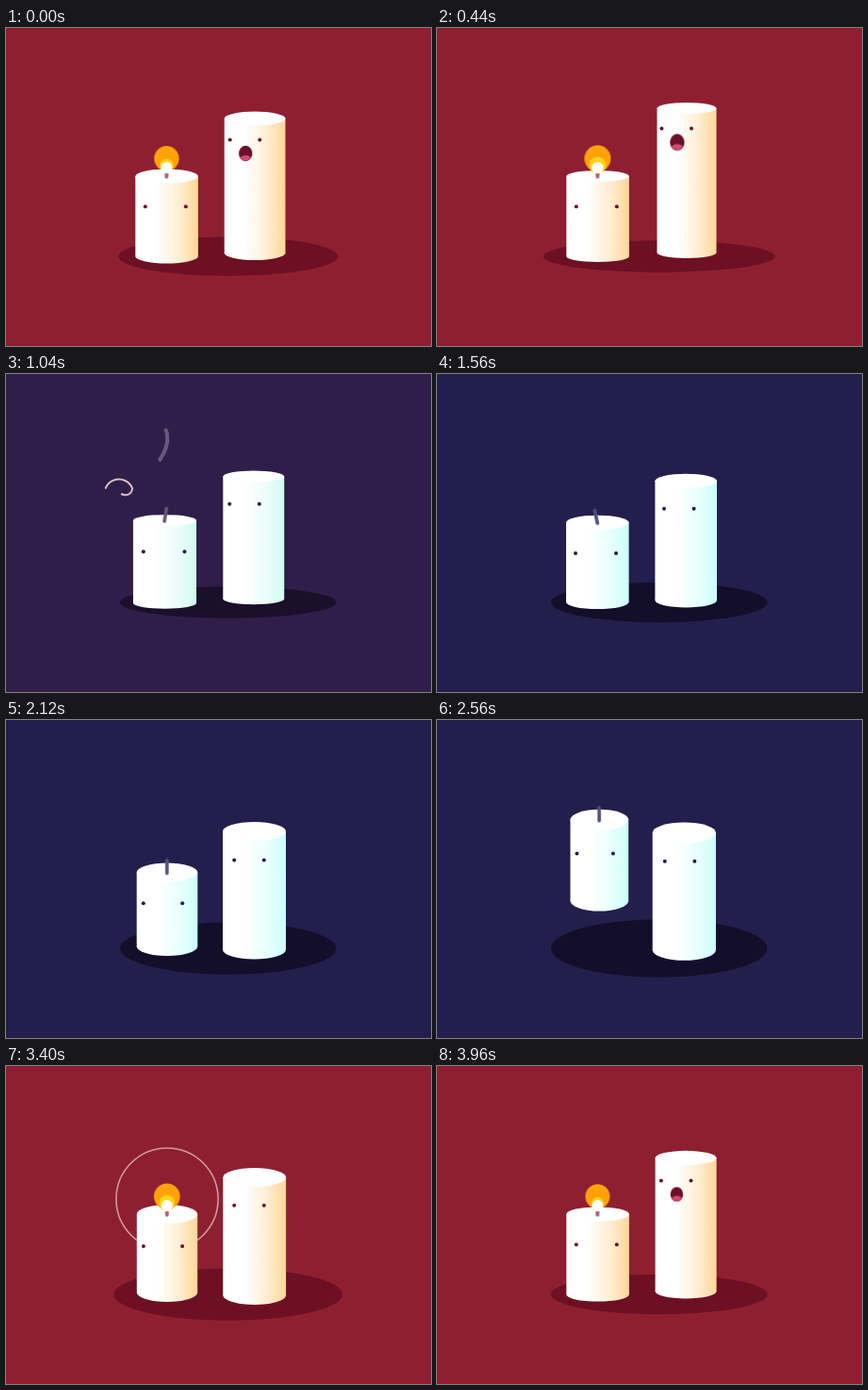
An HTML page without scripts that plays this animation: 451 by 337 pixels, repeating every 4 s.

```html
<!DOCTYPE html>
<html lang="en">
<head>
<meta charset="utf-8">
<title>Two candles</title>
<style>
@property --tilt { syntax: "<length>"; inherits: true; initial-value: 20px; }
@property --flick { syntax: "<number>"; inherits: true; initial-value: 0; }
@property --lit { syntax: "<number>"; inherits: true; initial-value: 1; }
@property --cx { syntax: "<length>"; inherits: true; initial-value: 0px; }
@property --rx { syntax: "<length>"; inherits: true; initial-value: 33px; }
@property --top { syntax: "<length>"; inherits: true; initial-value: 0px; }
@property --bot { syntax: "<length>"; inherits: true; initial-value: 0px; }
@property --ex { syntax: "<length>"; inherits: true; initial-value: 0px; }
@property --ey { syntax: "<length>"; inherits: true; initial-value: 0px; }
@property --gap { syntax: "<length>"; inherits: true; initial-value: 16px; }

html, body { margin: 0; width: 100%; height: 100%; overflow: hidden; background: #8e1f31; }
svg {
  display: block; width: 100vw; height: 100vh;
  --ry: calc(var(--tilt) * .36);
  animation:
    tilt 2s cubic-bezier(.37, 0, .63, 1) -1240ms infinite alternate,
    flick 166.667ms cubic-bezier(.37, 0, .63, 1) -50ms infinite alternate,
    lit 4s linear infinite,
    room 4s linear infinite;
}
svg * { animation: 4s linear infinite; }

@keyframes tilt { from { --tilt: 31px; } to { --tilt: 16px; } }
@keyframes flick { from { --flick: 0; } to { --flick: 1; } }
@keyframes lit { 0%, 15% { --lit: 1; } 18%, 66% { --lit: 0; } 76%, to { --lit: 1; } }
@keyframes room {
  0%, 16.5% { background: #8e1f31; }
  19% { background: #741c33; }
  27%, 66% { background: #241e4c; }
  70% { background: #721c33; }
  75%, to { background: #8e1f31; }
}

/* Floor and light */
.floor {
  cx: 235.7px; cy: 242px;
  rx: calc(114.8px + 8.3px * var(--flick) * var(--lit)); ry: var(--tilt);
  animation-name: floor;
}
@keyframes floor {
  0%, 16.5% { fill: #6e1023; }
  19% { fill: #540f2d; }
  27%, 66% { fill: #130f2b; }
  70% { fill: #5c0e24; }
  75%, to { fill: #6e1023; }
}
.ring { fill: none; stroke: #f3cccf; stroke-width: 1.6; animation-name: ring; }
@keyframes ring {
  0%, 74% { r: 12px; opacity: 0; }
  75% { r: 14px; opacity: .9; animation-timing-function: cubic-bezier(.3, .5, .7, 1); }
  85% { r: 54px; opacity: .7; }
  90%, to { r: 68px; opacity: 0; }
}

/* Candle parts */
.side { fill: url(#wax); }
rect.side {
  x: calc(var(--cx) - var(--rx)); y: var(--top);
  width: calc(var(--rx) * 2); height: calc(var(--bot) - var(--top));
}
ellipse.side, .lid { cx: var(--cx); cy: var(--bot); rx: var(--rx); ry: var(--ry); }
.lid { cy: var(--top); fill: #fff; }
.eye { r: 2px; cy: var(--ey); cx: calc(var(--ex) - var(--gap)); animation-name: ink; }
.eye + .eye { cx: calc(var(--ex) + var(--gap)); }
@keyframes ink {
  0%, 17% { fill: #6b1029; }
  27%, 66% { fill: #231c4b; }
  70% { fill: #351c48; }
  76%, to { fill: #6b1029; }
}
.mid { animation-name: mid; }
.edge { animation-name: edge; }
@keyframes mid {
  0%, 19% { stop-color: #fff0d8; }
  27%, 66% { stop-color: #ecffff; }
  70% { stop-color: #e9f7f4; }
  75%, to { stop-color: #fff0d8; }
}
@keyframes edge {
  0%, 16% { stop-color: #ffd698; }
  19% { stop-color: #ffdea3; }
  27%, 66% { stop-color: #cbfffb; }
  70% { stop-color: #c8e8e1; }
  75%, to { stop-color: #ffd698; }
}

/* Tall candle: breathes in, blows, settles */
.tall { --gap: 15.8px; animation-name: tall; }
@keyframes tall {
  0%, to { --cx: 264.1px; --rx: 32.4px; --top: 96px; --bot: 238.5px; --ex: 253.5px; --ey: 118.5px; }
  9% { --cx: 265px; --rx: 31.5px; --top: 85px; --bot: 238px; --ex: 254.5px; --ey: 106px; }
  12.5% { --cx: 265px; --rx: 31.5px; --top: 85px; --bot: 238px; --ex: 254px; --ey: 107px; }
  16% { --cx: 261.5px; --rx: 32.4px; --top: 104px; --bot: 237.5px; --ex: 249px; --ey: 133px; }
  19% { --cx: 262px; --rx: 32.3px; --top: 106px; --bot: 237.5px; --ex: 251px; --ey: 135px; }
  39% { --cx: 264.2px; --rx: 32.8px; --top: 113.3px; --bot: 239.8px; --ex: 256.8px; --ey: 142.7px; }
  53% { --cx: 263.5px; --rx: 33.5px; --top: 118px; --bot: 243.5px; --ex: 258px; --ey: 148.5px; }
  70% { --cx: 261.7px; --rx: 33.7px; --top: 120.3px; --bot: 243.8px; --ex: 257.3px; --ey: 150.5px; }
  85% { --cx: 263.7px; --rx: 33.4px; --top: 118px; --bot: 243px; --ex: 258px; --ey: 147.8px; }
  88% { --cx: 263.8px; --rx: 33.3px; --top: 117px; --bot: 242.5px; --ex: 257.5px; --ey: 146px; }
  99% { --cx: 264.1px; --rx: 32.5px; --top: 97.5px; --bot: 238.8px; --ex: 253.7px; --ey: 121.5px; }
}
.face { transform: translate(calc(var(--ex) + .7px), calc(var(--ey) + 14.5px)); }
.mouth { animation-name: mouth; }
@keyframes mouth {
  0% { transform: scale(1); }
  11% { transform: scale(1.08); }
  14% { transform: scale(.5); }
  17% { transform: scale(.4); }
  18%, 88% { transform: scale(0); }
  95% { transform: scale(.85); }
  99% { transform: scale(.94); }
  to { transform: scale(1); }
}

/* Short candle: pushed by the breath, later jumps and relights */
.short { animation-name: short; }
@keyframes short {
  0%, 13%, 99%, to { --cx: 170.6px; --rx: 33.3px; --top: 157px; --bot: 242px; --ex: 169.3px; --ey: 189.3px; --gap: 21.5px; }
  17% { --cx: 167px; --rx: 33.7px; --top: 154px; --bot: 243.5px; --ex: 166.5px; --ey: 187px; --gap: 22px; }
  19% { --cx: 167.5px; --rx: 33.7px; --top: 154px; --bot: 243.5px; --ex: 167.2px; --ey: 187.3px; --gap: 22px; }
  39% { --cx: 170.3px; --rx: 33.3px; --top: 157.3px; --bot: 241.5px; --ex: 168.5px; --ey: 190px; --gap: 21.5px; }
  53% { --cx: 171px; --rx: 32.3px; --top: 161.5px; --bot: 240px; --ex: 166.5px; --ey: 194.2px; --gap: 20.7px; }
  60% { --cx: 171px; --rx: 34.5px; --top: 170px; --bot: 240px; --ex: 166.5px; --ey: 201px; --gap: 21.5px; }
  62% { --cx: 171.5px; --rx: 30.5px; --top: 148px; --bot: 238px; --ex: 167px; --ey: 183px; --gap: 19px; animation-timing-function: cubic-bezier(.2, .6, .5, 1); }
  67.5% { --cx: 172.7px; --rx: 31px; --top: 88px; --bot: 172px; --ex: 168px; --ey: 124px; --gap: 19.3px; animation-timing-function: cubic-bezier(.5, 0, .8, .6); }
  70% { --cx: 173px; --rx: 30.4px; --top: 98px; --bot: 183px; --ex: 168px; --ey: 134px; --gap: 19.3px; }
  74% { --cx: 172px; --rx: 31px; --top: 154px; --bot: 240px; --ex: 167.5px; --ey: 188px; --gap: 20px; }
  76.5% { --cx: 171px; --rx: 34.5px; --top: 167px; --bot: 240px; --ex: 166.5px; --ey: 199px; --gap: 21.5px; }
  80% { --cx: 171px; --rx: 31.8px; --top: 155px; --bot: 240px; --ex: 166.5px; --ey: 189.5px; --gap: 20.5px; }
  85% { --cx: 171px; --rx: 32.2px; --top: 157px; --bot: 240px; --ex: 166.5px; --ey: 191px; --gap: 20.6px; }
}
.wax { animation-name: smear; animation-timing-function: step-end; }
@keyframes smear {
  0%, 73.5% { filter: none; }
  69% { filter: url(#smear); }
}

/* Wick and flame */
.post { transform: translate(calc(var(--cx) - .2px), var(--top)); }
.wick { stroke-width: 3.6; stroke-linecap: round; animation-name: wick; }
@keyframes wick {
  0%, 14% { transform: none; stroke: #b5646c; }
  17% { transform: rotate(-58deg); stroke: #b5646c; }
  19% { transform: rotate(-44deg); stroke: #a8727c; }
  25% { transform: rotate(14deg); stroke: #6a5878; }
  31% { transform: rotate(-18deg); stroke: #4c4a78; }
  35% { transform: rotate(4deg); }
  39% { transform: rotate(-12deg); }
  44% { transform: rotate(5deg); }
  49%, 62% { transform: none; stroke: #53517f; }
  70% { transform: none; stroke: #6a4a66; }
  76%, to { transform: none; stroke: #b5646c; }
}
.flame { animation-name: flame; }
@keyframes flame {
  0%, 13.5% { transform: none; }
  16% { transform: rotate(-48deg) scale(.7, .9); }
  17.5% { transform: rotate(-65deg) scale(0); }
  65% { transform: scale(0); }
  67.5% { transform: scale(.7, .75); }
  70% { transform: scale(.83, .93); }
  75% { transform: scale(.85, 1.1); }
  78%, to { transform: none; }
}
.outer { cy: -18.7px; r: calc(13px + 1px * var(--flick)); fill: #ffa20a; }
.inner { cy: -11.5px; r: calc(6.5px + 2.5px * var(--flick)); fill: #ffd21c; }

/* Breath and smoke */
.wind, .smoke { fill: none; stroke-linecap: butt; }
.wind { stroke: #f0d3d6; stroke-width: 2; stroke-dasharray: 74 300; animation-name: wind; }
@keyframes wind {
  0%, 13.5% { stroke-dashoffset: 75; opacity: 1; }
  19% { stroke-dashoffset: -26; opacity: 1; }
  30% { stroke-dashoffset: -100; opacity: .8; }
  31%, to { stroke-dashoffset: -101; opacity: 0; }
}
.smoke { stroke-dasharray: 24 300; stroke-linecap: round; animation-name: smoke; }
@keyframes smoke {
  0%, 17% { stroke-dashoffset: 23; stroke-width: 4; stroke: #b5606c; opacity: 0; }
  17.5% { opacity: 1; }
  19% { stroke-dashoffset: 0; stroke-width: 5; stroke: #a8505f; opacity: 1; }
  27% { stroke-dashoffset: -45; stroke-width: 4; stroke: #6d6690; opacity: .8; }
  35%, to { stroke-dashoffset: -85; stroke-width: 1; stroke: #4c4a78; opacity: 0; }
}
</style>
</head>
<body>
<svg viewBox="0 0 451 337" preserveAspectRatio="xMidYMid slice">
  <defs>
    <linearGradient id="wax">
      <stop offset=".34" stop-color="#fff"/>
      <stop class="mid" offset=".66"/>
      <stop class="edge" offset="1"/>
    </linearGradient>
    <filter id="smear" x="-10%" y="-10%" width="120%" height="120%" color-interpolation-filters="sRGB">
      <feGaussianBlur stdDeviation="0 1.5"/>
    </filter>
  </defs>

  <ellipse class="floor"/>
  <circle class="ring" cx="171" cy="141"/>

  <g class="short">
    <g class="wax">
      <ellipse class="side"/>
      <rect class="side"/>
      <ellipse class="lid"/>
      <circle class="eye"/>
      <circle class="eye"/>
    </g>
    <g class="post">
      <path class="wick" d="M0 1V-13"/>
      <g class="flame">
        <circle class="outer"/>
        <circle class="inner"/>
        <path d="M0 -2C-3 -3 -6 -5 -6 -9A6 6 0 0 1 6 -9C6 -5 3 -3 0 -2Z" fill="#fff"/>
        <path d="M0 1.5L-2 -2Q0 -4 2 -2Z" fill="#b5646c"/>
      </g>
    </g>
  </g>

  <path class="smoke" pathLength="100" d="M167 133C151 132 149 119 153 108C158 94 174 84 171 64C168 48 148 42 152 14"/>
  <path class="wind" pathLength="100" d="M235 142H122A15.3 15.3 0 1 1 134 121C134 127 128 130 122 127"/>

  <g class="tall">
    <ellipse class="side"/>
    <rect class="side"/>
    <ellipse class="lid"/>
    <circle class="eye"/>
    <circle class="eye"/>
    <g class="face">
      <g class="mouth">
        <ellipse rx="7.2" ry="8.2" fill="#6b0f2b"/>
        <path d="M-5.6 4Q0 -.5 5.6 4Q3.6 7.6 0 7.6T-5.6 4Z" fill="#d24a6c"/>
      </g>
    </g>
  </g>
</svg>
</body>
</html>
```
